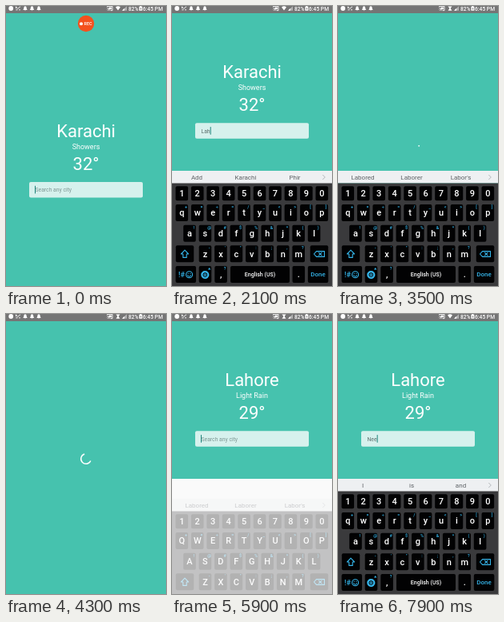
Write an HTML page that moves like this. It is 200 px wide and 350 px high and loops after 8 s.

```html
<!DOCTYPE html>
<html lang="en">
<head>
<meta charset="utf-8">
<title>City weather search</title>
<style>
  html, body { margin: 0; width: 100%; height: 100%; overflow: hidden; background: #46c2ae; }
  svg { display: block; width: 100vw; height: 100vh; }
  text { font-family: Roboto, sans-serif; fill: #fff; white-space: pre; }
  .mid { text-anchor: middle; }
  .key { fill: #020203; }
  .cap { font-size: 11px; font-weight: 500; }
  .hint { font-size: 5.5px; font-weight: 500; fill: #35b5ea; }
  .word { font-size: 8px; fill: #5d6165; }
  .line { fill: none; stroke: #35b5ea; stroke-width: 1.1; stroke-linejoin: round; stroke-linecap: round; }
  .field { font-size: 6.8px; }
  .status { font-size: 6.7px; font-weight: 500; }
</style>
</head>
<body>
<svg viewBox="0 0 200 350" preserveAspectRatio="none">
  <defs>
    <path id="bell" d="M-2.7 2.1 Q-1.7 1 -1.7 -.7 Q-1.6 -2.6 0 -2.8 Q1.6 -2.6 1.7 -.7 Q1.7 1 2.7 2.1Z M-.8 2.5H.8L0 3.3Z" fill="#fff"/>
  </defs>
  <rect width="200" height="350" fill="#46c2ae"/>

  <g id="weather">
    <text id="city" class="mid" x="100" y="164" font-size="22"></text>
    <text id="sky" class="mid" x="100" y="178.6" font-size="9"></text>
    <text id="temp" class="mid" x="100" y="204.6" font-size="22"></text>
    <rect x="29" y="220" width="142" height="19.5" rx="2" fill="#fff" fill-opacity=".78"/>
    <text id="entry" class="field" x="36.5" y="232.4"></text>
    <rect id="caret" y="224.8" width="1" height="9.6" fill="#1f857c"/>
  </g>

  <path id="spinner" fill="none" stroke="#fff" stroke-width="1.5"/>

  <g id="rec">
    <circle cx="100" cy="22" r="10.2" fill="#f4511e"/>
    <circle cx="94" cy="22.2" r="2" fill="#fff"/>
    <text x="97.6" y="24.2" font-size="5.4" font-weight="500">REC</text>
  </g>

  <rect id="backing" y="206" width="200" height="144" fill="#fafafa"/>
  <g id="board">
    <rect y="206" width="200" height="15.5" fill="#eef0f2"/>
    <rect y="221.5" width="200" height="166" fill="#3a3a3c"/>
    <path d="M188.3 211 L191.3 214 L188.3 217" fill="none" stroke="#b4b8bb"/>
  </g>

  <g id="bar">
    <rect width="200" height="9" fill="#757575"/>
    <circle cx="6.2" cy="3" r="2.9" fill="#fff"/>
    <path d="M12.3 1 L14.8 3.2 L18 .8 M12.3 4.8 H14.6 M16 4.8 H18 M12.5 .8 V3" fill="none" stroke="#fff" stroke-width=".9"/>
    <use href="#bell" x="24" y="3"/>
    <use href="#bell" x="32.5" y="3"/>
    <use href="#bell" x="41" y="3"/>
    <path d="M126.5 1.5 V.4 H133 V5.6 H130.6 M126.5 3 Q129 3 129.2 5.8 M126.5 4.7 L127.5 5.7" fill="none" stroke="#fff" stroke-width=".9"/>
    <rect x="128.5" y="1.6" width="3.4" height="2.6" fill="#fff"/>
    <path id="wifi" fill="#fff"/>
    <path d="M145 5.8 L151 .2 V5.8Z" fill="#fff" opacity=".45"/>
    <path d="M145 5.8 L148 3 V5.8Z" fill="#fff"/>
    <text class="status" x="153" y="5.5">82%</text>
    <path d="M166.4 .8 H167.5 V0 H169.3 V.8 H170.4 V5.8 H166.4Z" fill="#fff"/>
    <path d="M168.8 1.4 L167.4 3.6 H168.4 L168 5.2 L169.5 2.9 H168.5Z" fill="#757575"/>
    <text class="status" x="196" y="5.5" text-anchor="end">6:45 PM</text>
  </g>
</svg>
<script>
const LOOP = 8000, STEP = 100;
const $ = id => document.getElementById(id);
const board = $('board');

function add(tag, attrs, text = '') {
  const el = document.createElementNS('http://www.w3.org/2000/svg', tag);
  for (const k in attrs) el.setAttribute(k, attrs[k]);
  el.textContent = text;
  return board.appendChild(el);
}
const label = (cls, x, y, text) => add('text', { class: cls + ' mid', x, y }, text);
const stroke = d => add('path', { class: 'line', d });
const plate = (x, y, width, height = 21) =>
  add('rect', { class: 'key', x: x - width / 2, y, width, height, rx: 2 });

// Keyboard rows
const PITCH = 19.45, letters = [];
function row(chars, x0, y, height, hints = '') {
  [...chars].forEach((c, i) => {
    const x = x0 + i * PITCH;
    plate(x, y, 15.6, height);
    const cap = label('cap', x, y + height / 2 + 3.9, c);
    if (hints) {
      label('hint', x + 5.2, y + 5, hints[i]);
      letters.push(cap);
    }
  });
}
row('1234567890', 12.3, 225.3, 18);
row('qwertyuiop', 12.3, 248, 21, '+×÷=/_<>[]');
row('asdfghjkl', 22, 273.8, 21, '!@#$%&*()');
row('zxcvbnm', 41.5, 299.3, 21, '-\'":;,?');

plate(16, 299.3, 22.5);
stroke('M16 305.2 L20.6 310 H18.2 V314.4 H13.8 V310 H11.4Z');
plate(184, 299.3, 22.5);
stroke('M177.5 310 L180.5 306.6 H190.5 V313.4 H180.5Z M183.6 308.4 L187 311.6 M187 308.4 L183.6 311.6');

const Y = 325;
[[17.3, 25.5], [41.5, 15.6], [61.1, 15.6], [110, 74], [158.3, 15.6], [182.6, 25.5]]
  .forEach(([x, w]) => plate(x, Y, w));
add('text', { class: 'hint', x: 8, y: 339, style: 'font-size:9px' }, '!#');
stroke('M17.6 335.7 a4 4 0 1 0 8 0 a4 4 0 1 0 -8 0 M19.6 336.8 Q21.6 339.6 23.6 336.8 M20.2 334.2 v.3 M23 334.2 v.3');
const gear = add('circle', { class: 'line', cx: 41.3, cy: 336, r: 4.2 });
gear.style.strokeWidth = 1.8;
gear.style.strokeDasharray = '2.2 1.1';
add('circle', { class: 'line', cx: 41.3, cy: 336, r: 3.3 });
add('circle', { class: 'line', cx: 41.3, cy: 336, r: 1.3 });
add('path', { d: 'M45 329.5 L46.7 327 L48.4 329.5Z', fill: '#35b5ea' });
label('cap', 61.1, 339, ',');
label('hint', 66, 330, '?');
label('cap', 110, 338, 'English (US)').style.fontSize = '7px';
label('cap', 158.3, 339, '.');
const done = label('hint', 182.6, 338.4, 'Done');
done.style.fontSize = '8px';
const words = [31, 92, 153.5].map(x => label('word', x, 217, ''));

// Timelines: [time, value], the latest reached entry holds
const at = (list, t) => list.reduce((v, [time, next]) => t >= time ? next : v, list[0][1]);
const within = (t, a, b) => t >= a && t < b;
const ramp = (t, a, b) => Math.min(1, Math.max(0, (t - a) / (b - a)));
const ease = p => p * p * (3 - 2 * p);

const typed = [[0, ''], [1500, 'L'], [1800, 'La'], [2000, 'Lah'], [2300, 'Laho'], [2500, 'Lahor'],
  [2800, 'Lahore'], [4800, ''], [6700, 'N'], [7200, 'Ne'], [7700, 'Nee']];
const guesses = [[0, 'Add Karachi Phir'], [2400, "Labored Laborer Labor's"], [6200, 'I is and']];
const upper = [[0, true], [1600, false], [4800, true], [6800, false]];
const caretOn = [[0, true], [500, false], [900, true], [1400, false], [1500, true],
  [4800, false], [5700, true]];

function set(el, text) {
  if (el.textContent !== text) el.textContent = text;
}
const show = (id, on) => $(id).setAttribute('opacity', +on);

function drawSpinner(t) {
  const s = (t - 3450) / 1000;
  const on = within(t, 3450, 4800);
  show('spinner', on);
  if (!on) return;
  const turn = 74 * s - 90;
  const point = deg => {
    const a = deg * Math.PI / 180;
    return `${100 + 6.3 * Math.cos(a)} ${181 + 6.3 * Math.sin(a)}`;
  };
  const from = turn + 270 * ease(ramp(s, .667, 1.333));
  const to = turn + 270 * ease(ramp(s, 0, .667)) + 10;
  $('spinner').setAttribute('d', `M${point(from)} A6.3 6.3 0 ${+(to - from > 180)} 1 ${point(to)}`);
}

function render(t) {
  const later = t >= 4800;
  set($('city'), later ? 'Lahore' : 'Karachi');
  set($('sky'), later ? 'Light Rain' : 'Showers');
  set($('temp'), later ? '29°' : '32°');

  const raised = within(t, 250, 3600) || t >= 5750;
  show('weather', !within(t, 3300, 4800));
  $('weather').setAttribute('transform', `translate(0 ${raised ? -73.7 : 0})`);

  const text = at(typed, t), entry = $('entry');
  set(entry, text || 'Search any city');
  entry.style.fill = text ? '#5a6f6c' : '#7c9793';
  $('caret').setAttribute('x', 36 + (text ? entry.getComputedTextLength() + .6 : 0));
  show('caret', at(caretOn, t));

  show('rec', 1 - ramp(t, 100, 500));
  drawSpinner(t);

  // The keyboard rises while fading in, and leaves the same way
  const p = t < 3500 ? ramp(t, 280, 700) : t < 4800 ? 1 - ramp(t, 3550, 3950) : ramp(t, 5780, 6200);
  show('backing', raised && !within(t, 3500, 4800));
  show('board', p);
  board.setAttribute('transform', `translate(0 ${35 * (1 - p)})`);
  const big = at(upper, t);
  letters.forEach(el => set(el, big ? el.textContent.toUpperCase() : el.textContent.toLowerCase()));
  at(guesses, t).split(' ').forEach((w, i) => set(words[i], w));

  $('wifi').setAttribute('d', within(t, 3200, 7600)
    ? 'M137.5 .4 H142.5 L140.6 3 L142.5 5.8 H137.5 L139.4 3Z'
    : 'M137 1.4 Q140 -.8 143 1.4 L140 5.6Z');
}

const start = performance.now();
function tick() {
  const t = (performance.now() - start) % LOOP;
  render(Math.floor(t / STEP) * STEP);
  requestAnimationFrame(tick);
}
tick();
</script>
</body>
</html>
```
